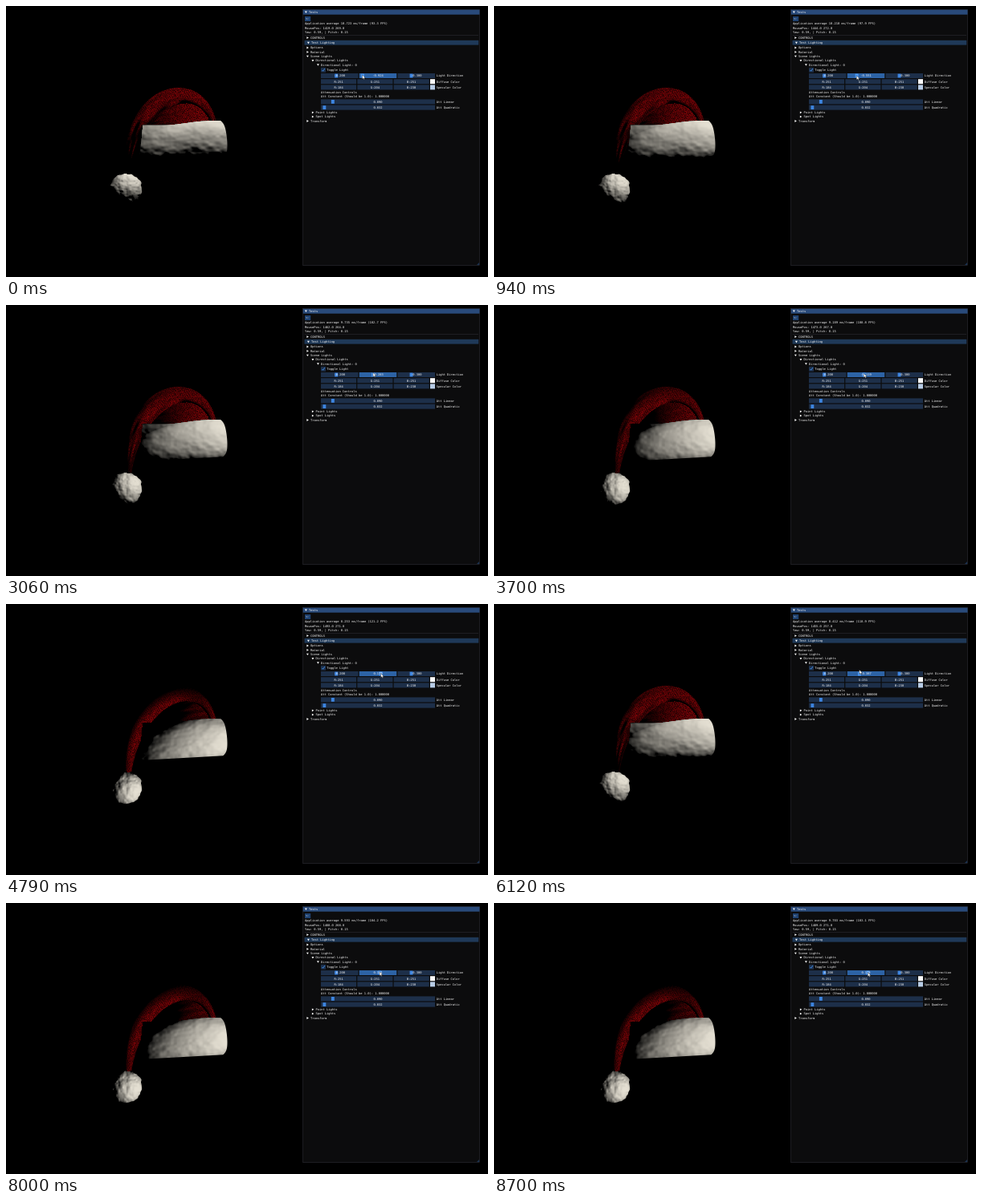
These frames come from a looping animation (600x338 px, 8.73 s). An HTML page with a canvas:

```html
<!DOCTYPE html>
<html lang="en">
<head>
<meta charset="utf-8">
<title>Directional light test</title>
<style>
  html, body { margin: 0; width: 100%; height: 100%; overflow: hidden; background: #000; }
  canvas, svg { position: absolute; left: 0; top: 0; }
  svg text {
    font: 3.72px "DejaVu Sans Mono", "Liberation Mono", monospace;
    fill: #f4f4f4; white-space: pre; text-rendering: geometricPrecision;
  }
</style>
</head>
<body>
<canvas id="stage" width="600" height="338"></canvas>
<svg id="ui" width="600" height="338" viewBox="0 0 600 338"></svg>
<script>
const LOOP = 8730, STEP = 30;

// turning points of the drag: time, mouse x, mouse y
const DRAG = [
  [0, 1419, 269], [900, 1444, 272], [2000, 1439, 274], [2650, 1440, 270],
  [3060, 1462, 264], [3480, 1489, 268], [3950, 1452, 266], [4420, 1490, 271],
  [4790, 1493, 271], [5300, 1490, 268], [5750, 1443, 260], [6120, 1455, 257],
  [7080, 1456, 257], [7300, 1465, 257], [7900, 1488, 268], [8700, 1489, 271]
];
// time, milliseconds per frame
const SPEED = [[0, 10.723], [2000, 9.619], [3060, 9.735], [4790, 8.236],
  [6120, 8.412], [7300, 9.489], [8700, 9.703]];

const clamp = (v, a = 0, b = 1) => Math.min(b, Math.max(a, v));
const smooth = k => k * k * (3 - 2 * k);
const mix = (a, b, k) => a + (b - a) * k;

function sample(keys, t, col, ease = k => k) {
  let i = 1;
  while (i < keys.length - 1 && keys[i][0] < t) i++;
  const a = keys[i - 1], b = keys[i];
  return mix(a[col], b[col], ease(clamp((t - a[0]) / (b[0] - a[0]))));
}

/* ---------- hat ---------- */
const X0 = 122, Y0 = 98, W = 160, H = 158;
const FUR = [228, 223, 210], CLOTH = [150, 4, 8];

function hash(x, y) {
  let h = Math.imul(x, 374761393) ^ Math.imul(y, 668265263);
  h = Math.imul(h ^ (h >>> 13), 1274126177);
  return ((h ^ (h >>> 16)) >>> 0) / 4294967296;
}
function noise(x, y) {
  const i = Math.floor(x), j = Math.floor(y), u = smooth(x - i), v = smooth(y - j);
  return mix(mix(hash(i, j), hash(i + 1, j), u), mix(hash(i, j + 1), hash(i + 1, j + 1), u), v);
}
const lumps = (x, y, s) => noise(x / s, y / s) + 0.4 * noise(x * 2 / s + 31, y * 2 / s);

// tilt a normal by the slope of a height function
function bump(n, height, x, y, amount) {
  const e = 0.6, h = height(x, y);
  n[0] -= (height(x + e, y) - h) / e * amount;
  n[1] += (height(x, y + e) - h) / e * amount;
  return n;
}
const ball = (nx, ny) => [nx, ny, Math.sqrt(Math.max(0.04, 1 - nx * nx - ny * ny))];

// folded tip: a tube along one Bezier from the right rim to the pompom
const bezier = (a, b, c, d, k) => {
  const m = 1 - k;
  return m * m * m * a + 3 * m * m * k * b + 3 * m * k * k * c + k * k * k * d;
};
const spine = Array.from({ length: 41 }, (_, i) => {
  const k = i / 40;
  return {
    k, r: 4 + 8 * Math.sin(Math.PI * Math.pow(k, 1.3)),
    x: bezier(257, 238, 157, 152, k), y: bezier(142, 86, 108, 210, k)
  };
});

function tail(x, y) {
  let best = null;
  for (let i = 1; i < spine.length; i++) {
    const a = spine[i - 1], b = spine[i], dx = b.x - a.x, dy = b.y - a.y;
    const f = clamp(((x - a.x) * dx + (y - a.y) * dy) / (dx * dx + dy * dy));
    const r = mix(a.r, b.r, f), ox = (x - a.x - dx * f) / r, oy = (y - a.y - dy * f) / r;
    const d = Math.hypot(ox, oy);
    if (!best || d < best.d) best = { d, r, ox, oy, k: mix(a.k, b.k, f), turn: Math.sign(ox * dy - oy * dx) };
  }
  const cover = clamp((1 - best.d) * best.r + 0.5);
  if (!cover) return null;
  const n = ball(best.ox * 0.95, -best.oy * 0.95);
  n[2] *= 0.75;
  n[1] += 0.7 * clamp((150 - y) / 40) - 0.8 * clamp((y - 138) / 62);
  const fold = (noise(best.k * 9, best.turn * best.d * 3 + 20) - 0.5) * 0.9;
  n[0] += fold * 0.5;
  n[1] += fold;
  return { n, cover, color: CLOTH, cloth: true };
}

function dome(x, y) {
  const dx = (x - 213) / 45, dy = (147 - y) / 41;
  const cover = y > 152 ? 0 : clamp((1 - Math.hypot(dx, dy)) * 42 + 0.5);
  if (!cover) return null;
  const n = [dx - 0.35, 0.55 + 0.4 * dy, 0.45];
  bump(n, (a, b) => noise((a + b) / 15, (b + a * 0.15) / 4), x, y, 1.1);
  return { n, cover, color: CLOTH, cloth: true };
}

function pom(x, y) {
  const dx = (x - 149.5) / 20, dy = (y - 229) / 20;
  const cover = clamp((1 - Math.hypot(dx, dy)) * 20 + 0.5 + (noise(x / 4, y / 4) - 0.5) * 2);
  if (!cover) return null;
  const n = bump(ball(dx, -dy), (a, b) => lumps(a, b, 5), x, y, 1.25);
  return { n, cover, color: FUR };
}

function band(x, y) {
  const u = (x - 167) / 108;
  const top = 148.5 - 5.5 * smooth(clamp((u - 0.25) / 0.55)), bottom = 195 - 6 * u;
  const left = 170 - (y - 148) * 0.09;
  const right = 271 + 4.5 * Math.sin(clamp((y - 143) / 46) * 2.3) - 5 * Math.pow(Math.abs(y - 166) / 24, 6);
  const cover = clamp(Math.min(y - top, bottom - y, x - left, right - x) + 0.5);
  if (!cover) return null;
  const s = 1 - 2 * clamp((y - top) / (bottom - top)), side = clamp(1 - u / 0.6);
  const nx = -0.8 * side + 0.75 * Math.pow(clamp((u - 0.6) / 0.4), 1.5);
  const ny = 0.82 * Math.sign(s) * Math.pow(Math.abs(s), 1.3) + 0.42 * side;
  const n = bump(ball(nx, ny), (a, b) => lumps(a / 1.3, b, 7), x, y, 0.95);
  return { n, cover, color: FUR };
}

const texels = [];
for (let j = 0; j < H; j++) for (let i = 0; i < W; i++) {
  const x = X0 + i + 0.5, y = Y0 + j + 0.5;
  let top = null;
  for (const part of [dome, tail, pom, band]) {
    const hit = part(x, y);
    if (hit && (!top || hit.cover >= 0.5)) top = hit;
  }
  if (!top) continue;
  const len = Math.hypot(...top.n);
  let gain = top.cover;
  if (top.cloth) {
    const weave = 0.5 + 0.5 * Math.sin(x * 1.9 + y * 0.7) * Math.sin(y * 2.1 - x * 0.4);
    gain *= 0.15 + 0.5 * hash(i, j) + 0.35 * weave;
  }
  texels.push({ at: (j * W + i) * 4, n: top.n.map(c => c / len), rgb: top.color.map(c => c * gain) });
}

const ctx = document.getElementById("stage").getContext("2d");
const image = ctx.createImageData(W, H);
for (let i = 3; i < image.data.length; i += 4) image.data[i] = 255;

function drawHat(dirY) {
  const light = [0.42, -dirY, 0.42], len = Math.hypot(...light);
  const [lx, ly, lz] = light.map(c => c / len);
  for (const { at, n, rgb } of texels) {
    const d = Math.pow(clamp(n[0] * lx + n[1] * ly + n[2] * lz), 0.72);
    for (let c = 0; c < 3; c++) image.data[at + c] = rgb[c] * d;
  }
  ctx.putImageData(image, X0, Y0);
}

/* ---------- panel ---------- */
const FRAME = "#1d2f49", GRAB = "#3d85e0";
const LEFT = 392, WIDTH = 142, GAP = 1.25, LABEL = 535.7;
const rect = (x, y, w, h, fill, more = "") =>
  `<rect x="${x}" y="${y}" width="${w}" height="${h}" fill="${fill}" ${more}/>`;
const text = (x, y, s, more = "") => `<text x="${x}" y="${y + 1.35}" ${more}>${s}</text>`;
const mid = (x, y, s, more = "") => text(x, y, s, 'text-anchor="middle" ' + more);
const rule = y => rect(371.5, y, 216.5, 0.4, "#3a3a44");
const node = (x, y, s, open) => {
  const shape = open ? "-1.4,-1 1.4,-1 0,1.4" : "-1,-1.4 1.4,0 -1,1.4";
  return `<polygon points="${shape}" transform="translate(${x - 3.6} ${y})" fill="#fff"/>` + text(x, y, s);
};
const box = (x, y, w, fill = FRAME) => rect(x, y - 3, w, 6, fill);
const grab = (x, y, fill = GRAB, more = "") => rect(x, y - 2.4, 3.9, 4.8, fill, more);
const third = (WIDTH - 2 * GAP) / 3;
const slotX = i => LEFT + i * (third + GAP);
const grabX = (i, v) => slotX(i) + 0.6 + (v + 1) / 2 * (third - 5.1);

const dirSlot = (i, v) =>
  box(slotX(i), 87, third) + grab(grabX(i, v), 87) + mid(slotX(i) + third / 2, 87, v.toFixed(3));
const wideSlider = (y, v, x, label) =>
  box(LEFT, y, WIDTH) + grab(x, y) + mid(LEFT + WIDTH / 2, y, v) + text(LABEL, y, label);
function colorRow(y, rgb, label) {
  const w = (WIDTH - 6 - 3 * GAP) / 3;
  return rgb.map((v, i) => {
    const x = LEFT + i * (w + GAP);
    return box(x, y, w) + mid(x + w / 2, y, "RGB"[i] + ":" + v);
  }).join("") + box(LEFT + WIDTH - 6, y, 6, `rgb(${rgb})`) + text(LABEL, y, label);
}

document.getElementById("ui").innerHTML =
  rect(369.7, 4.7, 219.8, 318.8, "#0c0c0d", 'stroke="#34343e" stroke-width=".5"') +
  rect(369.7, 4.7, 219.8, 6, "#294a7a") + node(377, 7.6, "Tests", true) +
  rect(372, 13, 7.2, 6, "#1f4271") + mid(375.6, 16, "&lt;-") +
  text(372, 22, "", 'id="fps"') + text(372, 27.4, "", 'id="pos"') +
  text(372, 32.8, "Yaw: 0.59, | Pitch: 0.15") +
  rule(36.2) + node(379, 39.6, "CONTROLS") +
  rect(371.5, 42.8, 216.8, 5.8, "#1f3958") + node(380, 45.8, "Test Lighting", true) +
  node(379, 52, "Options") + node(379, 57.4, "Material") + node(379, 62.7, "Scene Lights", true) +
  node(385.5, 68, "Directional Lights", true) + node(392, 73.3, "Directional Light: 0", true) +
  box(LEFT, 79.8, 6) +
  '<path d="M393.3 79.8l1.3 1.4 2.2-3" fill="none" stroke="#4296fa" stroke-width=".9"/>' +
  text(399.3, 79.8, "Toggle Light") +
  dirSlot(0, -0.2) + dirSlot(2, -0.3) + text(LABEL, 87, "Light Direction") +
  box(slotX(1), 87, third, "#2d63a6") + grab(0, 87, "#4c9cfb", 'id="grab"') +
  mid(slotX(1) + third / 2, 87, "", 'id="dir"') +
  colorRow(94.2, [251, 251, 251], "Diffuse Color") +
  colorRow(101.4, [184, 204, 230], "Specular Color") +
  text(LEFT, 107.6, "Attenuation Controls") +
  text(LEFT, 113, "Att Constant (Should be 1.0): 1.000000") +
  wideSlider(119.4, "0.090", 404.9, "Att Linear") +
  wideSlider(126.6, "0.032", 394.4, "Att Quadratic") +
  node(385.5, 132.8, "Point Lights") + node(385.5, 138.1, "Spot Lights") +
  node(379, 143.5, "Transform") +
  '<path d="M589 320V323H586Z" fill="#1a3252"/>' +
  '<path id="cursor" d="M0 0V5.4L1.3 4.3 2.1 6.1 3 5.7 2.2 4H3.9Z" fill="#fff" stroke="#000" stroke-width=".4"/>';

const [fps, pos, dir, knob, cursor] =
  ["fps", "pos", "dir", "grab", "cursor"].map(id => document.getElementById(id));

function draw(t) {
  const mx = Math.round(sample(DRAG, t, 1, smooth));
  const my = Math.round(sample(DRAG, t, 2, smooth));
  const ms = sample(SPEED, t, 1);
  const dirY = clamp((mx - 1481) * 0.0149, -1, 1);
  fps.textContent = `Application average ${ms.toFixed(3)} ms/frame (${(1000 / ms).toFixed(1)} FPS)`;
  pos.textContent = `MousePos: ${mx}.0 ${my}.0`;
  dir.textContent = dirY.toFixed(3);
  knob.setAttribute("x", grabX(1, dirY));
  cursor.setAttribute("transform", `translate(${mx / 3.2} ${my / 3.2 + 1.7})`);
  drawHat(dirY);
}

const start = performance.now();
let last = -1;
function tick() {
  const t = Math.floor(((performance.now() - start) % LOOP) / STEP) * STEP;
  if (t !== last) draw(last = t);
  requestAnimationFrame(tick);
}
tick();
</script>
</body>
</html>
```
